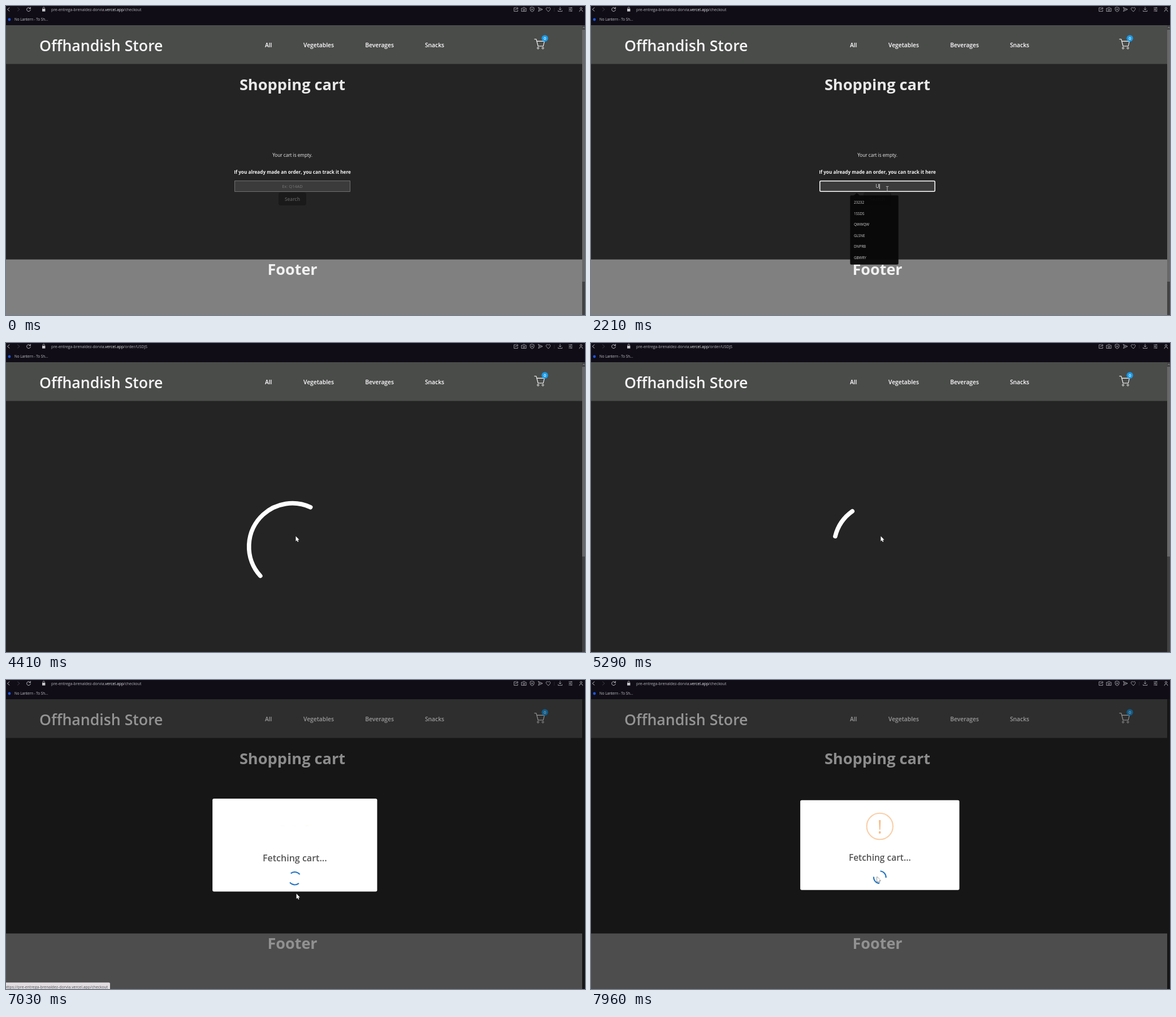
Recreate the animation shown at these times as an HTML page with a canvas. Size 1024x547 px, loop 8 s.

```html
<!DOCTYPE html>
<html lang="en">
<head>
<meta charset="utf-8">
<title>Store checkout</title>
<style>
html, body { margin: 0; width: 100%; height: 100%; overflow: hidden; background: #242424; }
canvas { display: block; width: 100%; height: 100%; }
</style>
</head>
<body>
<canvas id="stage"></canvas>
<script>
const W = 1024, H = 547, LOOP = 8000, MID = 506.5;
const canvas = document.getElementById('stage');
const ctx = canvas.getContext('2d');
const dpr = window.devicePixelRatio || 1;
canvas.width = W * dpr;
canvas.height = H * dpr;

const HOST = ['pre-entrega-brenaldez-dorvia', '.vercel.app'];
const CODE = 'USDJS';
const KEY_TIMES = [2210, 2270, 2350, 2440, 2540];
const SUGGESTIONS = ['23232', '1SSDS', 'QWWQW', 'GLSNE', 'DNPRB', 'GBWRY'];
const INPUT = [404, 309, 205, 20];
const SEARCH = [482, 330, 49, 23];
const BACK = [471, 364, 71, 24];

const T = {
  focus: 1340, list: 1400, press: 3870, order: 4010, spin: 3987,
  message: 5350, pressBack: 6490, modal: 6931, icon: 6968, cart: 6960
};

// Pointer path: time, x, y
const PATH = [
  [330, 912, 526], [930, 527, 322], [1200, 527, 322], [1330, 524, 324],
  [3340, 524, 324], [3800, 512.5, 342], [5620, 512.5, 342],
  [6350, 516.5, 380], [6960, 516.5, 380], [7090, 511.5, 377], [7830, 506, 348.5]
];

const clamp = v => Math.max(0, Math.min(1, v));
const lerp = (a, b, k) => a + (b - a) * k;
const ramp = (t, from, to) => clamp((t - from) / (to - from));
const smooth = k => k * k * (3 - 2 * k);

function bezier(x1, y1, x2, y2) {
  const at = (a, b, s) => 3 * a * s * (1 - s) ** 2 + 3 * b * s * s * (1 - s) + s ** 3;
  return x => {
    let lo = 0, hi = 1;
    for (let i = 0; i < 24; i++) {
      const m = (lo + hi) / 2;
      if (at(x1, x2, m) < x) lo = m; else hi = m;
    }
    return at(y1, y2, lo);
  };
}
const ease = bezier(.25, .1, .25, 1);
const easeInOut = bezier(.42, 0, .58, 1);

// Piecewise values, eased inside every segment
function track(stops, t, curve) {
  if (t <= stops[0][0]) return stops[0][1];
  for (let i = 1; i < stops.length; i++) {
    const [a, va] = stops[i - 1], [b, vb] = stops[i];
    if (t < b) return lerp(va, vb, curve((t - a) / (b - a)));
  }
  return stops[stops.length - 1][1];
}

function text(str, x, y, size, { weight = 400, color = '#fff', align = 'left' } = {}) {
  ctx.font = `${weight} ${size}px "Open Sans", "Noto Sans", sans-serif`;
  ctx.textAlign = align;
  ctx.fillStyle = color;
  ctx.fillText(str, x, y);
  return ctx.measureText(str).width;
}

function rect(x, y, w, h, color) {
  ctx.fillStyle = color;
  ctx.fillRect(x, y, w, h);
}

function box([x, y, w, h], r, fill, line, width = 1) {
  ctx.beginPath();
  ctx.roundRect(x, y, w, h, r);
  ctx.fillStyle = fill;
  ctx.fill();
  if (!line) return;
  ctx.beginPath();
  ctx.roundRect(x + width / 2, y + width / 2, w - width, h - width, r);
  ctx.strokeStyle = line;
  ctx.lineWidth = width;
  ctx.stroke();
}

function disc(x, y, r, color) {
  ctx.beginPath();
  ctx.arc(x, y, r, 0, Math.PI * 2);
  ctx.fillStyle = color;
  ctx.fill();
}

function stroke(d, x, y, color, width = 0.9) {
  ctx.save();
  ctx.translate(x, y);
  ctx.strokeStyle = color;
  ctx.lineWidth = width;
  ctx.lineJoin = ctx.lineCap = 'round';
  ctx.stroke(new Path2D(d));
  ctx.restore();
}

function shape(d, x, y, fill, line, width) {
  ctx.save();
  ctx.translate(x, y);
  const p = new Path2D(d);
  ctx.lineJoin = 'round';
  ctx.strokeStyle = line;
  ctx.lineWidth = width;
  ctx.stroke(p);
  ctx.fillStyle = fill;
  ctx.fill(p);
  ctx.restore();
}

const ICONS = [
  [902, 'M0 -3H-3.5V3.5H3V1M-1 1Q-1 -2 3.5 -2M1.5 -4L3.5 -2L1.5 0'],
  [916, 'M-4 -2H-2L-1 -3.5H1L2 -2H4V3.5H-4ZM1.6 .7A1.6 1.6 0 1 1 -1.6 .7A1.6 1.6 0 1 1 1.6 .7'],
  [930.5, 'M0 -4L3.5 -2.8V0Q3.5 3 0 4.2Q-3.5 3 -3.5 0V-2.8ZM-1.4 -1.4L1.4 1.4M1.4 -1.4L-1.4 1.4'],
  [945, 'M-3.5 -3.5L4 0L-3.5 3.5L-2 0ZM-2 0H1'],
  [959, 'M0 3.8L-3.3 .4C-5.2 -2 -1.8 -5 0 -2.2C1.8 -5 5.2 -2 3.3 .4Z'],
  [980, 'M0 -4V1M-2 -1L0 1L2 -1M-3.5 2V3.5H3.5V2'],
  [998.5, 'M-3 -2.8H3M-3 0H3M-3 2.8H3M1 -3.4V-2.2M-1 -.6V.6M1 2.2V3.4'],
  [1017, 'M1.7 -1.8A1.7 1.7 0 1 1 -1.7 -1.8A1.7 1.7 0 1 1 1.7 -1.8M-3 3.8Q-3 1 0 1Q3 1 3 3.8']
];

function drawBrowser(page) {
  rect(0, 0, W, 34, '#100d17');
  const pale = '#c9c8cc', dim = '#b6b5bb';
  stroke('M2 -3L-1.5 0L2 3', 4, 6, pale);
  stroke('M-1.5 -3L2 0L-1.5 3', 22, 6, '#45434c');
  stroke('M3 -1.6A3.4 3.4 0 1 0 3.4 .8M3.4 -3.8V-1.4H1', 40, 6, pale);
  rect(64, 5, 5.4, 4.6, pale);
  stroke('M-1.5 0V-1.5A1.5 1.5 0 0 1 1.5 -1.5V0', 66.7, 5, pale, 0.8);
  let x = 80;
  x += text(HOST[0], x, 8.8, 6.85, { color: dim });
  x += text(HOST[1], x, 8.8, 6.85, { weight: 500, color: '#f2f2f4' });
  text(page, x, 8.8, 6.85, { color: dim });
  for (const [ix, d] of ICONS) stroke(d, ix, 6, pale, 0.7);
  rect(969.5, 3, 0.6, 7, '#3a3842');
  disc(6, 24, 2.4, '#1c55e0');
  text('No Lantern - To Sh...', 15, 26.4, 6.3, { color: '#c4c3c8' });
}

function drawHeader() {
  rect(0, 34, 1019, 68.6, '#4a4c4a');
  text('Offhandish Store', 59, 79.8, 26.7, { weight: 600, color: '#f6f6f6' });
  const nav = [['All', 464.2], ['Vegetables', 553], ['Beverages', 660.6], ['Snacks', 758]];
  for (const [label, x] of nav) text(label, x, 72.6, 10.3, { weight: 600, align: 'center' });
  stroke('M0 0H3.2L6.4 12.2H15.6L17.6 3.6H4.2', 934.6, 58.8, '#fff', 1.1);
  for (const x of [941, 949.5]) {
    ctx.beginPath();
    ctx.arc(x, 74.5, 1.5, 0, Math.PI * 2);
    ctx.lineWidth = 1;
    ctx.strokeStyle = '#fff';
    ctx.stroke();
  }
  disc(953, 57.2, 5.7, '#189bea');
  text('0', 953, 59.9, 7.2, { weight: 600, align: 'center' });
}

function drawScrollbar(end) {
  rect(1019, 34, 5, H - 34, '#424242');
  rect(1019, 42, 5, end - 42, '#686868');
  stroke('M-1.3 .8L0 -.7L1.3 .8', 1021.8, 38, '#b5b5b5', 0.8);
}

function drawButton(area, label, color, line, width) {
  box(area, 4, '#1a1a1a', line, width);
  text(label, area[0] + area[2] / 2, area[1] + area[3] / 2 + 3, 8.3,
    { weight: 600, color, align: 'center' });
}

function drawList(alpha) {
  ctx.save();
  ctx.globalAlpha = alpha;
  ctx.fillStyle = 'rgba(8,8,8,.95)';
  ctx.beginPath();
  ctx.roundRect(458.3, 335.3, 85.4, 122.5, 2);
  ctx.moveTo(465, 335.3);
  ctx.lineTo(470, 331);
  ctx.lineTo(475, 335.3);
  ctx.fill();
  SUGGESTIONS.forEach((s, i) => text(s, 465, 350.2 + i * 19.55, 6.3, { color: '#d2d2d2' }));
  ctx.restore();
}

function drawCheckout(t) {
  const white = { weight: 700, color: '#e9e9e9', align: 'center' };
  const typed = CODE.slice(0, KEY_TIMES.filter(k => t >= k && t < T.cart).length);
  const focused = t >= T.focus && t < T.press;
  const pressed = t >= T.press && t < T.order;

  text('Shopping cart', MID, 148.8, 27.2, white);
  text('Your cart is empty.', MID, 266.5, 8.2, { color: '#ededed', align: 'center' });
  text('If you already made an order, you can track it here', MID, 297.3, 8.2,
    { weight: 700, color: '#f4f4f4', align: 'center' });

  box(INPUT, focused ? 2 : 0, '#3b3b3b', focused ? '#fff' : '#707070', focused ? 1.5 : 1);
  let caret = MID;
  if (typed) {
    const w = text(typed, MID, 322.4, 8.2, { weight: 500, color: '#f0f0f0', align: 'center' });
    caret += w / 2 + 0.3;
  } else {
    text('Ex: Q14AD', MID, 322.3, 7.5, { color: '#767676', align: 'center' });
  }
  const since = KEY_TIMES.filter(k => t >= k).pop() || T.focus;
  if (focused && (t - since) % 1060 < 530) rect(caret, 315, 0.9, 9, '#fff');

  drawButton(SEARCH, 'Search', typed === CODE ? '#fff' : '#5e5e5e', pressed && '#fff', 1.4);
  rect(0, 448.7, 1019, H - 448.7, '#808080');
  text('Footer', MID, 475.8, 27, { ...white, color: '#f1f1f1' });
  if (t >= T.list && t < KEY_TIMES[1]) drawList(ramp(t, T.list - 60, 1600));
}

function drawSpinner(t) {
  const e = t - T.spin, turn = e / 2000, half = (e % 1500) / 750;
  const k = easeInOut(half % 1), first = half < 1;
  const round = 125.66;
  const dash = first ? lerp(1, 89, k) : 89;
  const from = first ? 35 * k : lerp(35, 124, k);
  const rad = v => (v / round + turn) * Math.PI * 2;
  ctx.beginPath();
  ctx.arc(MID, 360.5, 76.8, rad(from), rad(Math.min(from + dash, round)));
  ctx.lineWidth = 7.7;
  ctx.lineCap = 'round';
  ctx.strokeStyle = '#fff';
  ctx.stroke();
  ctx.lineCap = 'butt';
}

function drawOrder(t, hover) {
  if (t < T.message) return drawSpinner(t);
  text('The specified order does not exist in our database, please check the order ID and try again.',
    MID, 352.4, 8.2, { weight: 700, color: '#f4f4f4', align: 'center' });
  const line = t >= T.pressBack ? '#fff' : hover ? '#646cff' : null;
  drawButton(BACK, 'Back to Cart', '#fff', line, t >= T.pressBack ? 1.4 : 0.8);
}

function drawModal(t) {
  rect(0, 34, W, H - 34, `rgba(0,0,0,${0.4 * ramp(t, T.modal, T.modal + 100)})`);
  const p = (t - T.modal) / 300, cx = 510.8, cy = 292.2;
  const scale = track([[0, .7], [.45, 1.05], [.8, .95], [1, 1]], p, ease);
  ctx.save();
  ctx.translate(cx, cy);
  ctx.scale(scale, scale);
  box([-140.7, -79.5, 281.4, 159], 2.7, '#fff');
  text('Fetching cart...', 0, 27.6, 15.5, { weight: 600, color: '#545454', align: 'center' });

  const q = clamp((t - T.icon) / 500), flip = ease(q);
  ctx.save();
  ctx.translate(0, -33.2);
  ctx.scale(1, Math.cos(lerp(100, 0, flip) * Math.PI / 180));
  ctx.globalAlpha = flip;
  ctx.beginPath();
  ctx.arc(0, 0, 23.2, 0, Math.PI * 2);
  ctx.lineWidth = 2.1;
  ctx.strokeStyle = '#facea8';
  ctx.stroke();
  const swing = track([[0, 45], [.25, -25], [.5, 15], [.75, -5], [1, 0]], q, ease);
  ctx.rotate(swing * Math.PI / 180);
  ctx.globalAlpha = flip * track([[0, 0], [.25, .4], [.5, .8], [.75, 1]], q, ease);
  text('!', 0, 13, 32, { color: '#f8bb86', align: 'center' });
  ctx.restore();

  ctx.save();
  ctx.translate(0, 57);
  ctx.rotate((20 + (t - 7090) * 0.24) * Math.PI / 180);
  ctx.lineWidth = 2.1;
  ctx.strokeStyle = '#2778c4';
  for (const a of [0.25, 1.25]) {
    ctx.beginPath();
    ctx.arc(0, 0, 10.9, a * Math.PI, (a + 0.5) * Math.PI);
    ctx.stroke();
  }
  ctx.restore();
  ctx.restore();
}

function drawStatus(t) {
  const first = t < 5000;
  const alpha = first ? ramp(t, 3590, 3660) * (1 - ramp(t, 4200, 4340))
                      : ramp(t, 6070, 6140) * (1 - ramp(t, 7010, 7160));
  if (!alpha) return;
  ctx.save();
  ctx.globalAlpha = alpha;
  box([-4, 535.6, first ? 200 : 188, 14], 2, '#f8f4f8');
  const page = first ? '/order/' + CODE : '/checkout';
  text('https://' + HOST.join('') + page, -2.5, 545.6, 6.85, { color: '#3c3a40' });
  ctx.restore();
}

const inside = ([x, y, w, h], px, py) => px >= x && px <= x + w && py >= y && py <= y + h;

function pointer(t) {
  const axis = i => track(PATH.map(p => [p[0], p[i]]), t, smooth);
  const x = axis(1), y = axis(2);
  let kind = 'arrow';
  if (t < T.order) {
    if (inside(SEARCH, x, y)) kind = 'hand';
    else if (inside(INPUT, x, y)) kind = 'beam';
  } else if (t >= T.message && t < T.cart && inside(BACK, x, y)) kind = 'hand';
  return { x, y, kind };
}

function drawPointer(t, { x, y, kind }) {
  if (t < PATH[0][0]) return;
  const clicks = [[1330, 1530], [T.press, T.order], [T.pressBack, 6620]];
  if (clicks.some(([a, b]) => t >= a && t < b)) disc(x - 0.5, y, 6.6, 'rgba(196,184,20,.8)');
  if (kind === 'beam') {
    stroke('M-1.8 -4.5H-.6L0 -4L.6 -4.5H1.8M0 -4V4M-1.8 4.5H-.6L0 4L.6 4.5H1.8', x, y, '#d8d8d8', 0.8);
  } else if (kind === 'hand') {
    shape('M-1 .8Q0 -.6 1 .8V4.2L4.8 5.2Q6 5.6 5.8 7L5 11.5H-.6L-3.2 7.6Q-2.6 6 -1 7.4Z',
      x, y, '#fff', '#111', 1);
  } else {
    shape('M0 0V9L2 7.2L3.4 10.2L4.8 9.6L3.5 6.6H6.2Z', x, y, '#fff', '#222', 0.9);
  }
}

function draw(t) {
  ctx.setTransform(dpr, 0, 0, dpr, 0, 0);
  rect(0, 0, W, H, '#242424');
  const onOrder = t >= T.order && t < T.cart, modal = t >= T.cart;
  const ptr = pointer(t);
  drawHeader();
  if (onOrder) drawOrder(t, ptr.kind === 'hand');
  else drawCheckout(t);
  if (modal) drawModal(t);
  else drawScrollbar(onOrder ? 378 : 488);
  drawBrowser(onOrder ? '/order/' + CODE : '/checkout');
  drawStatus(t);
  drawPointer(t, ptr);
}

const start = performance.now();
function tick() {
  draw((performance.now() - start) % LOOP);
  requestAnimationFrame(tick);
}
tick();
</script>
</body>
</html>
```
